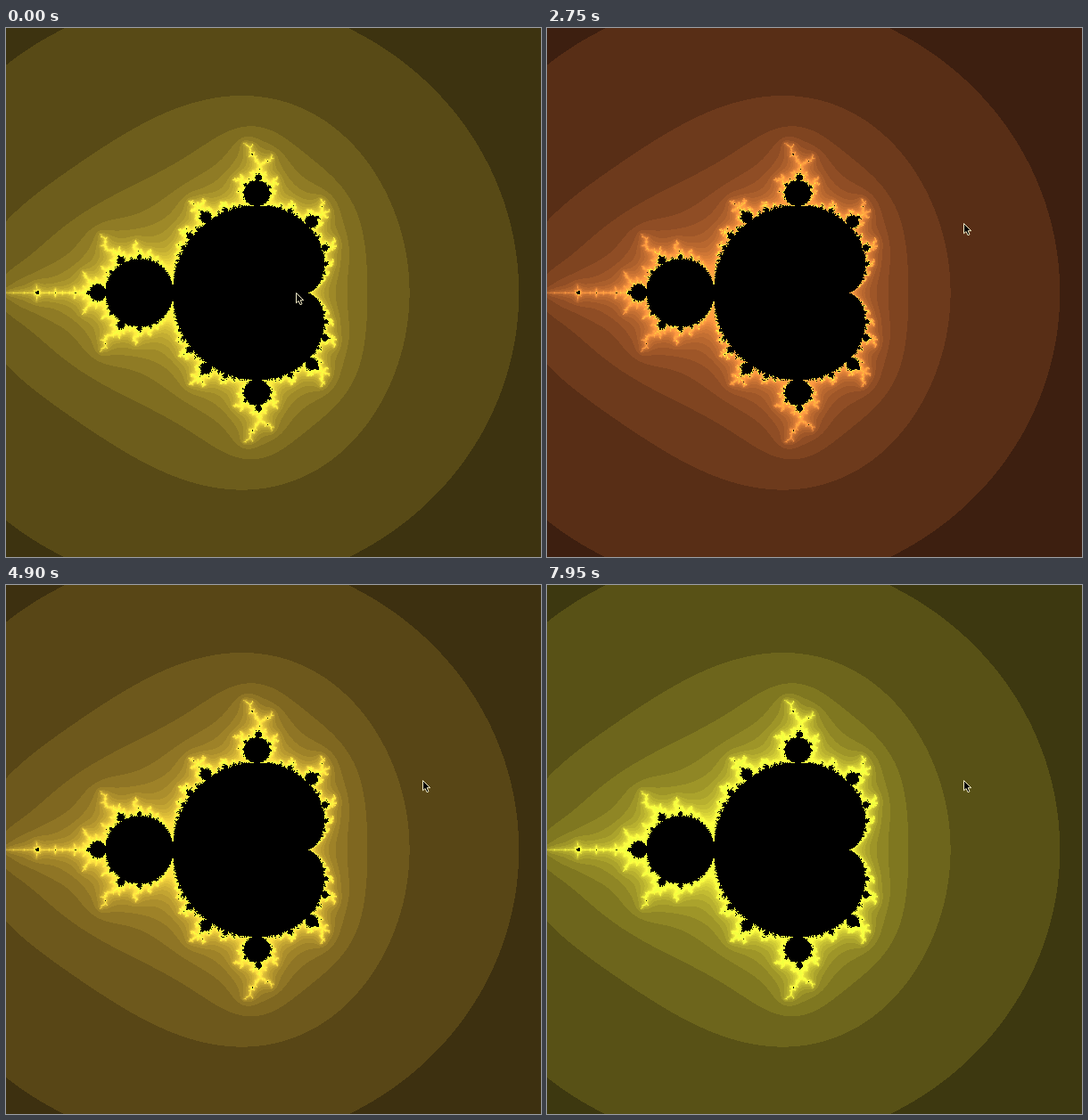
Recreate the animation shown at these times as an HTML page with a canvas. Size 600 px wide and 594 px high, loop 8 s.

```html
<!DOCTYPE html>
<html lang="en">
<head>
<meta charset="utf-8">
<title>Mandelbrot colour cycle</title>
<style>
  html, body { margin: 0; width: 100%; height: 100%; overflow: hidden; background: #000; }
  canvas { display: block; width: 600px; height: 594px; }
</style>
</head>
<body>
<canvas id="stage" width="600" height="594"></canvas>
<script>
const W = 600, H = 594, LOOP = 8000, STEP = 50;
const MAX_ITER = 100, ESCAPE = 26.75;
const ctx = document.getElementById('stage').getContext('2d');
const image = ctx.createImageData(W, H);
const pixels = new Uint32Array(image.data.buffer);
const counts = new Uint8Array(W * H);
const palette = new Uint32Array(MAX_ITER + 1);

function escapeCount(cx, cy) {
  let x = cx, y = cy;
  for (let n = 1; n < MAX_ITER; n++) {
    const nx = x * x - y * y + cx;
    y = 2 * x * y + cy;
    x = nx;
    if (x * x + y * y > ESCAPE) return n;
  }
  return MAX_ITER;
}

// Band 1 is "needs more than one step": the outermost corner.
for (let py = 0; py < H; py++) {
  for (let px = 0; px < W; px++) {
    counts[py * W + px] = escapeCount((px - 299.7) / 150.4, (py - 296.8) / 150.2);
  }
}

// The hue swings linearly between orange and yellow.
function baseHue(t) {
  const low = 2625, half = 4275;
  const phase = Math.abs(t - low) / half;
  return 19.7 + 44.3 * (phase > 1 ? 2 - phase : phase);
}

function hsvPixel(hue, sat, value) {
  const channel = k => {
    const p = (k + hue / 60) % 6;
    return Math.round(value * (1 - sat * Math.max(0, Math.min(p, 4 - p, 1))));
  };
  return (255 << 24 | channel(1) << 16 | channel(3) << 8 | channel(5)) >>> 0;
}

function paintSet(t) {
  const hue = baseHue(t);
  for (let n = 1; n < MAX_ITER; n++) {
    const shifted = Math.min(hue + (n - 1) * 0.5, Math.max(hue, 64));
    palette[n] = hsvPixel(shifted, 0.745, Math.min(255, 61 * Math.pow(n, 0.53)));
  }
  palette[MAX_ITER] = 0xff000000;
  for (let i = 0; i < counts.length; i++) pixels[i] = palette[counts[i]];
  ctx.putImageData(image, 0, 0);
}

const arrow = new Path2D('M0 0V11.3L2.6 9L4.5 13.2L6.5 12.3L4.7 8.2H8.2Z');

function paintCursor(t) {
  const u = Math.min(1, Math.max(0, (t - 150) / 750));
  const k = u * u * (3 - 2 * u);
  ctx.save();
  ctx.translate(325.5 + 142 * k, 297.5 - 78 * k);
  ctx.fillStyle = '#000';
  ctx.strokeStyle = '#f4eec8';
  ctx.lineWidth = 1;
  ctx.fill(arrow);
  ctx.stroke(arrow);
  ctx.restore();
}

let start = null, shown = -1;
function frame(now) {
  if (start === null) start = now;
  const t = Math.floor(((now - start) % LOOP) / STEP) * STEP;
  if (t !== shown) {
    shown = t;
    paintSet(t);
    paintCursor(t);
  }
  requestAnimationFrame(frame);
}
requestAnimationFrame(frame);
</script>
</body>
</html>
```
